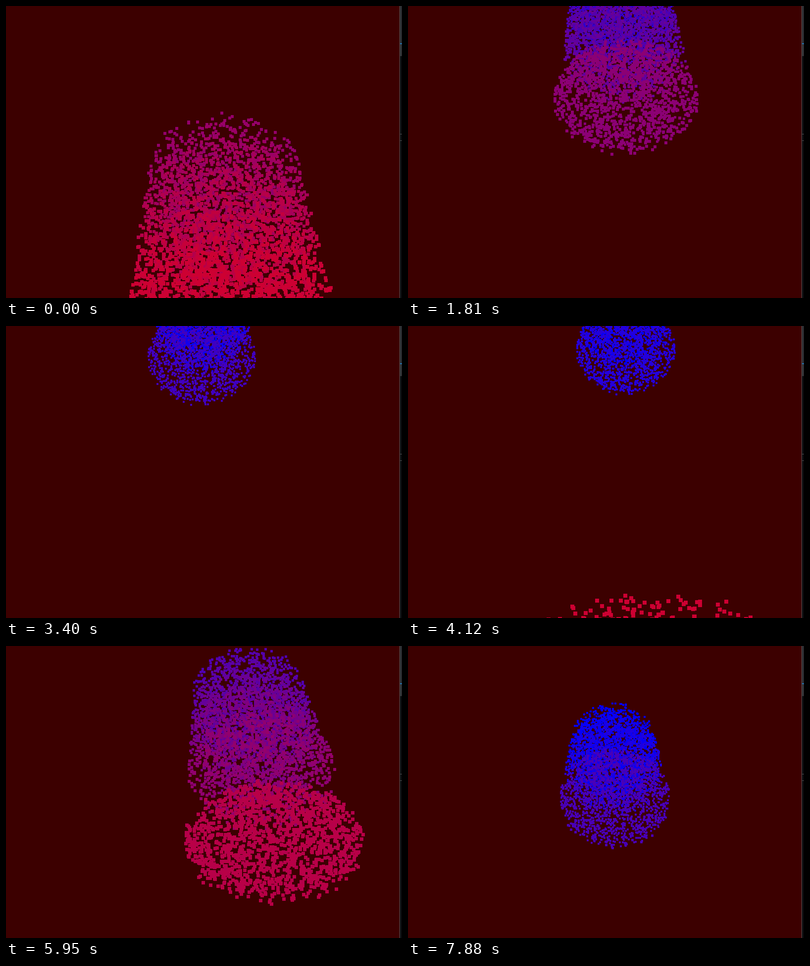
Write an HTML page with a canvas that moves like this. It is 800x589 px and loops after 8000 ms.

```html
<!DOCTYPE html>
<html lang="en">
<head>
<meta charset="utf-8">
<title>Particle bursts</title>
<style>
  html, body { margin: 0; width: 100%; height: 100%; overflow: hidden; background: #3c0000; }
  canvas { display: block; }
</style>
</head>
<body>
<canvas id="stage" width="800" height="589"></canvas>
<script>
const ctx = document.getElementById('stage').getContext('2d');
const W = 800, H = 589, VIEW = 795, LOOP = 8000;
const NEAR = 0.0015, FAR = 0.0116;   // visible depth range
const VANISH_X = 403, SLOPE = 4.45;
const LIFE = 4.3;

// Camera sway: [time, value] points joined with easing.
const leanKeys = [[0, 0.25], [1800, 0.26], [3500, -0.07], [4900, 1], [8000, 0.13]];
const vanishKeys = [[0, -345], [1800, -460], [4900, -385], [5900, -410], [8000, -186]];

function ease(keys, t) {
  let i = 1;
  while (i < keys.length - 1 && t > keys[i][0]) i++;
  const [t0, a] = keys[i - 1], [t1, b] = keys[i];
  const p = (t - t0) / (t1 - t0);
  return a + (b - a) * p * p * (3 - 2 * p);
}

function randomizer(seed) {
  return () => {
    seed = (seed + 0x6d2b79f5) | 0;
    let n = Math.imul(seed ^ (seed >>> 15), seed | 1);
    n ^= n + Math.imul(n ^ (n >>> 7), n | 61);
    return ((n ^ (n >>> 14)) >>> 0) / 4294967296;
  };
}

// A thin front disc followed, after a gap, by a long tube; farthest first.
function makeBurst(seed, start, speed) {
  const rnd = randomizer(seed), points = [];
  const add = (count, from, to) => {
    while (count--) {
      const angle = rnd() * Math.PI * 2, radius = Math.sqrt(rnd());
      points.push({
        x: radius * Math.cos(angle),
        y: radius * Math.sin(angle),
        depth: from + (to - from) * rnd()
      });
    }
  };
  add(1500, -0.0001, 0.0001);
  add(4200, 0.001, 0.0033);
  points.sort((a, b) => b.depth - a.depth);
  return { start, speed, points };
}

const bursts = [makeBurst(71, 0, 1), makeBurst(113, 5020, 1.12)];

function drawBurst({ start, speed, points }, t) {
  const age = (t - start) / 1000 * speed;
  if (age > LIFE) return;
  const front = 0.0034 + 0.0022 * age - 0.00014 * age * age;
  const lean = ease(leanKeys, t), vanishY = ease(vanishKeys, t);
  for (const p of points) {
    const z = front + p.depth;
    if (z < NEAR || z > FAR) continue;
    const r = 1 / z;
    const squash = Math.max(0.45, 1.27 - 0.0035 * r);
    const size = Math.round(r / 32 + 1);
    const x = VANISH_X + (lean + p.x) * r - size / 2;
    const y = vanishY + (SLOPE + p.y * squash) * r - size / 2;
    if (y < -size || y > H) continue;
    const red = Math.round(Math.max(0, Math.min(205, 190 - 32000 * (z - 0.0053))));
    bar(`rgb(${red},0,${255 - red})`, Math.round(x), Math.round(y), size, size);
  }
}

function bar(color, x, y, w, h) {
  ctx.fillStyle = color;
  ctx.fillRect(x, y, w, h);
}

function drawEdge() {
  const w = W - VIEW;
  bar('#0a0b0d', VIEW, 0, w, H);
  bar('#2b2c30', VIEW, 0, w, 75);
  bar('#1f6fb0', VIEW, 75, w, 2);
  bar('#303134', VIEW, 77, w, 24);
  bar('#4a4a4c', VIEW, 258, w, 1);
  bar('#4a4a4c', VIEW, 271, w, 1);
  bar('#5c5a5a', VIEW, 0, 1, H);
}

function draw(t) {
  bar('#3c0000', 0, 0, W, H);
  bursts.forEach(burst => drawBurst(burst, t));
  drawEdge();
}

const begin = performance.now();
function tick() {
  draw((performance.now() - begin) % LOOP);
  requestAnimationFrame(tick);
}
tick();
</script>
</body>
</html>
```
